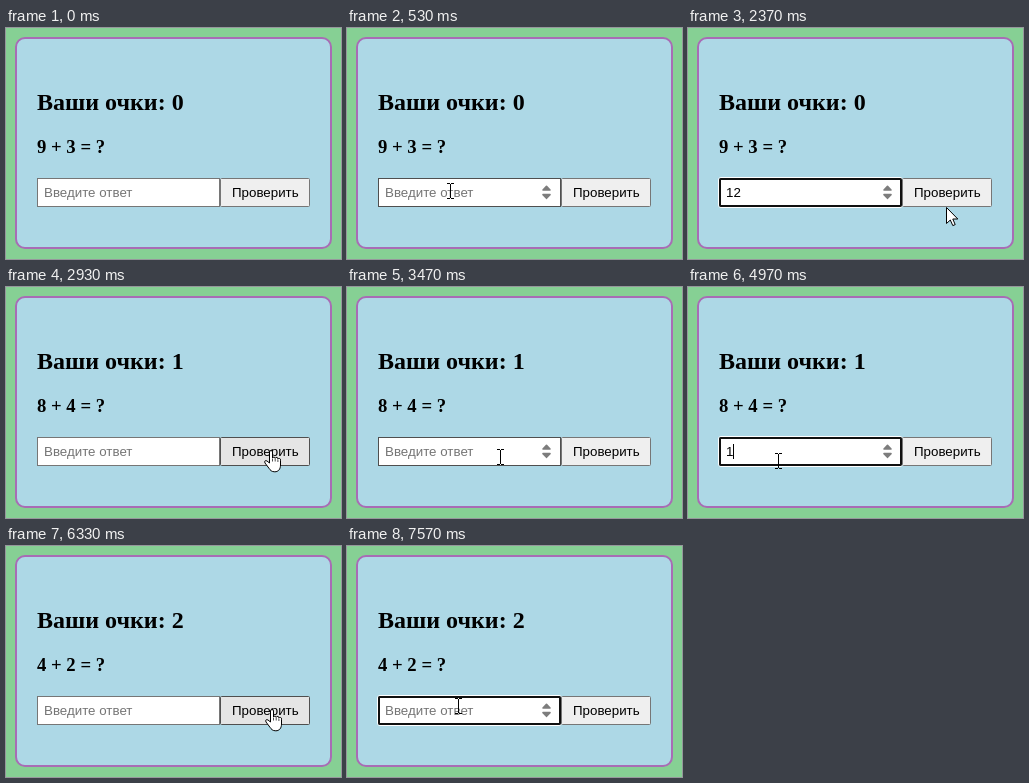
Recreate the animation shown at these times as an HTML page. Size 335 by 231 pixels, loop 8000 ms.

```html
<!DOCTYPE html>
<html lang="ru">
<head>
<meta charset="utf-8">
<style>
  html, body { margin: 0; width: 100%; height: 100%; overflow: hidden; background: #86d094; }
  svg { display: block; }
  text { white-space: pre; }
  .serif { font-family: "Liberation Serif", "Times New Roman", serif; font-weight: bold; }
  .sans { font: 13.333px "Liberation Sans", Arial, sans-serif; }
  .line { fill: none; stroke: #000; }
  .shape { fill: #fff; stroke: #000; stroke-linejoin: round; }
</style>
</head>
<body>
<svg width="335" height="231" viewBox="0 0 335 231">
  <rect width="335" height="231" fill="#86d094"/>
  <rect x="10" y="10" width="315" height="210" rx="9" fill="#add8e6" stroke="#a86cb5" stroke-width="2"/>
  <text id="score" class="serif" x="31" y="82" font-size="24"></text>
  <text id="task" class="serif" x="31" y="125" font-size="18.72"></text>

  <rect id="field" x="31.5" y="150.5" width="182" height="28" fill="#fff"/>
  <rect id="glow" x="30.5" y="149.5" width="184" height="30" rx="2.5" fill="none" stroke="#fff"/>
  <rect id="button" x="214.5" y="150.5" width="89" height="28" rx="1"/>
  <rect id="ring" x="32" y="151" width="181" height="27" rx="1" fill="none" stroke="#101010" stroke-width="2"/>
  <text class="sans" x="226" y="169">Проверить</text>
  <text id="hint" class="sans" x="38" y="169" fill="#757575">Введите ответ</text>
  <text id="value" class="sans" x="38" y="169"></text>
  <rect id="caret" y="157" width="1" height="15"/>
  <path id="spin" d="M196 162L199.5 158.3L203 162ZM196 166.6L199.5 170.3L203 166.6Z"
    fill="#7d7d7d" stroke="#7d7d7d" stroke-width="1.6" stroke-linejoin="round"/>

  <g id="cursor">
    <path id="arrow" class="shape" d="M.5 .5V16.5L4.3 13L6.8 18.6L9.2 17.6L6.8 12H11.8Z"/>
    <g id="hand" transform="translate(-6 0)">
      <path class="shape" d="M5.5 13V2a1.5 1.5 0 0 1 3 0V8a1.4 1.4 0 0 1 2.7 .4a1.4 1.4 0 0 1 2.7 .8a1.4 1.4 0 0 1 2.6 1V15C16.5 19 14.5 21.8 10.8 21.8C7.5 21.8 6.3 20.2 5 18.3L1 13C0 11 1.5 10 3 11Z"/>
      <path class="line" stroke-width=".7" d="M8.5 8.5V11.5M11.2 9V11.5M13.9 9.8V12"/>
    </g>
    <path id="beam" class="line" d="M-3 -7.5H0M1 -7.5H4M.5 -7V7M-3 7.5H0M1 7.5H4"/>
  </g>
</svg>
<script>
const LOOP = 8000, BLINK = 530, KEY_GAP = 230, ENTER = 70;
const $ = id => document.getElementById(id);
const show = (id, on) => $(id).setAttribute('visibility', on ? 'visible' : 'hidden');
const set = (id, attrs) => {
  for (const k in attrs) $(id).setAttribute(k, attrs[k]);
};

// Each round: sum asked, then the times of its clicks and first key.
const rounds = [
  { a: 9, b: 3, start: 0, focus: 670, type: 1570, press: 2800 },
  { a: 8, b: 4, start: 2930, focus: 4130, type: 4970, press: 6070 },
  { a: 4, b: 2, start: 6170, focus: 7030, type: Infinity, press: Infinity }
];

const easeOut = u => 1 - (1 - u) ** 1.85;
const easeInOut = u => u * u * (3 - 2 * u);

// The pointer sags below the form on its way to the button.
const toButton = (t0, t1, to) => ({ t0, t1, to, ease: easeInOut, dip: 38 });
const toField = (t0, t1, to) => ({ t0, t1, to, ease: easeOut, dip: 0 });
const home = [270, 176];
const moves = [
  toField(ENTER, 530, [103, 163]),
  toButton(1900, 2430, [264, 161]),
  toField(2600, 2630, [264, 163]),
  toField(3170, 3870, [90, 174]),
  toButton(5300, 5830, [267, 163]),
  toField(6330, 6870, [111, 160])
];

function pointer(t) {
  let [x, y] = home;
  for (const m of moves) {
    const u = Math.min(1, Math.max(0, (t - m.t0) / (m.t1 - m.t0)));
    const e = m.ease(u);
    x += (m.to[0] - x) * e;
    y += (m.to[1] - y) * e + m.dip * u * (1 - u ** 6);
  }
  return [Math.round(x), Math.round(y)];
}

function form(t) {
  const score = rounds.filter(r => r.start <= t).length - 1;
  const r = rounds[score];
  const keys = t < r.type ? 0 : 1 + Math.floor((t - r.type) / KEY_GAP);
  const value = String(r.a + r.b).slice(0, keys);
  const press = t >= r.press;
  const focus = t >= r.focus && !press;
  const lastInput = value ? r.type + (value.length - 1) * KEY_GAP : r.focus;
  const caret = focus && (t - lastInput) % (2 * BLINK) < BLINK;
  return { score, task: `${r.a} + ${r.b} = ?`, value, press, focus, caret };
}

function render(t) {
  const s = form(t);
  const [x, y] = pointer(Math.floor((t + 4) * 0.03) / 0.03);
  const visible = t >= ENTER;
  const inRow = visible && y >= 150 && y < 179;
  const overField = inRow && x >= 31 && x < 214;
  const overButton = inRow && x >= 214 && x < 304;

  $('score').textContent = 'Ваши очки: ' + s.score;
  $('task').textContent = s.task;
  $('value').textContent = s.value;
  show('hint', !s.value);
  show('glow', s.focus);
  show('ring', s.focus);
  show('spin', s.focus || overField);
  show('caret', s.caret);
  set('caret', { x: 38 + Math.floor(s.value.length * 7.415) });
  set('field', { stroke: overField ? '#4f4f4f' : '#767676' });
  set('button', {
    fill: s.press ? '#f5f5f5' : overButton ? '#e5e5e5' : '#efefef',
    stroke: s.press ? '#8d8d8d' : overButton ? '#4f4f4f' : '#767676'
  });
  set('cursor', { transform: `translate(${x} ${y})` });
  show('beam', overField);
  show('hand', overButton);
  show('arrow', visible && !overField && !overButton);
}

function loop() {
  render(performance.now() % LOOP);
  requestAnimationFrame(loop);
}
loop();
</script>
</body>
</html>
```
